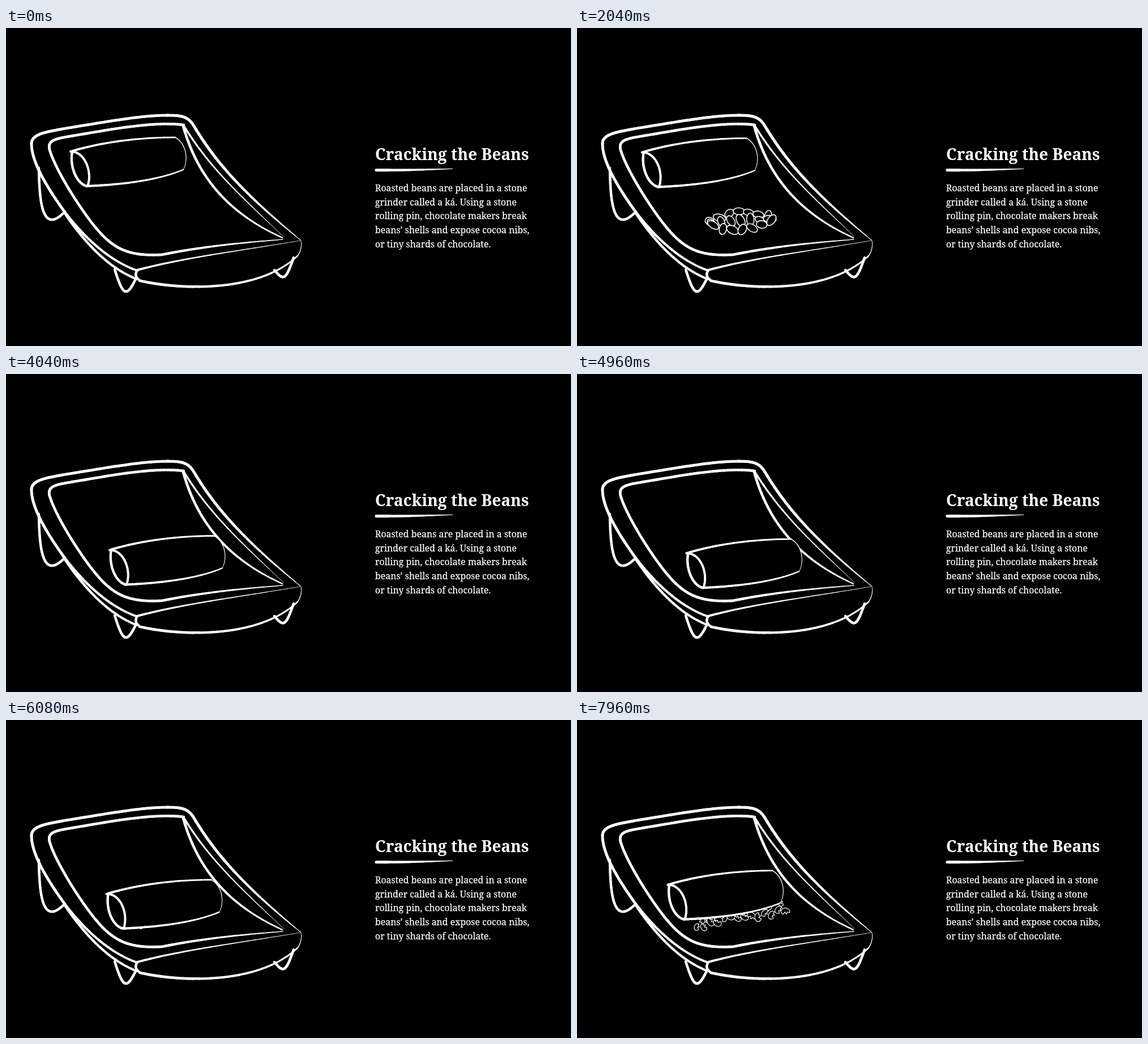
An HTML page with a canvas that plays this animation: 998 px wide and 561 px high, repeating every 8000 ms.

```html
<!DOCTYPE html>
<html lang="en">
<head>
<meta charset="utf-8">
<title>Cracking the Beans</title>
<style>
  html, body { margin: 0; width: 100%; height: 100%; overflow: hidden; background: #000; }
  canvas, svg { position: absolute; left: 0; top: 0; width: 998px; height: 561px; }
  text { fill: #fff; stroke: #fff; stroke-width: 0.25px; font: 15.9px "Noto Serif", serif; }
  .title { font-size: 28.1px; font-weight: 600; stroke: none; }
</style>
</head>
<body>
<canvas id="stage" width="998" height="561"></canvas>
<svg viewBox="0 0 998 561">
  <text class="title" x="652" y="233">Cracking the Beans</text>
  <text x="652" y="287.5">Roasted beans are placed in a stone</text>
  <text x="652" y="312.5">grinder called a ká. Using a stone</text>
  <text x="652" y="337">rolling pin, chocolate makers break</text>
  <text x="652" y="362">beans’ shells and expose cocoa nibs,</text>
  <text x="652" y="387">or tiny shards of chocolate.</text>
</svg>
<script>
const W = 998, H = 561, LOOP = 8000;
const ctx = document.getElementById('stage').getContext('2d');
const smooth = p => p * p * (3 - 2 * p);
const clamp = p => Math.max(0, Math.min(1, p));
const mix = (a, b, p) => a + (b - a) * p;
const random = n => { const v = Math.sin(n * 12.9898) * 43758.5453; return v - Math.floor(v); };

// Samples along joined cubic Béziers: a start, then three points per piece
function curve(...c) {
  const out = [], steps = 30;
  const axis = (i, u) => {
    const v = 1 - u;
    return v * v * v * c[i] + 3 * v * v * u * c[i + 2] + 3 * v * u * u * c[i + 4] + u * u * u * c[i + 6];
  };
  for (let i = 0; i + 7 < c.length; i += 6) {
    for (let s = 0; s <= steps; s++) out.push([axis(i, s / steps), axis(i + 1, s / steps)]);
  }
  return out;
}

// Stroke whose width runs from w0 to w1; a higher power tapers later
function brush(g, pts, w0, w1 = w0, power = 1) {
  g.strokeStyle = '#fff';
  g.lineCap = 'round';
  for (let i = 1; i < pts.length; i++) {
    g.lineWidth = mix(w0, w1, (i / pts.length) ** power);
    g.beginPath();
    g.moveTo(...pts[i - 1]);
    g.lineTo(...pts[i]);
    g.stroke();
  }
}

function drawGrinder(g) {
  const line = (pts, ...width) => brush(g, curve(...pts), ...width);
  // outer rim
  line([104, 325, 70, 278, 45, 235, 45, 204, 45, 186, 75, 183, 100, 178,
    180, 165, 240, 154, 285, 154, 310, 154, 322, 156, 332, 173], 4.8);
  line([332, 173, 375, 245, 430, 300, 520, 374], 5, 0.8, 3);
  line([104, 325, 140, 372, 185, 412, 232, 428], 4.6, 3.6);
  line([104, 327, 140, 380, 182, 424, 231, 443], 4.6, 3.8);
  // inner rim
  line([314, 171, 260, 164, 180, 180, 125, 189, 90, 195, 70, 196, 78, 218,
    90, 255, 135, 325, 160, 354, 195, 396, 225, 402, 275, 400], 4.6);
  line([275, 400, 340, 387, 400, 380, 489, 373], 4.6, 1.2, 1.4);
  line([313, 173, 340, 270, 400, 330, 488, 370], 4.6, 2.2, 2);
  line([315, 174, 365, 255, 430, 310, 490, 368], 3.6, 0.6);
  // front panel
  line([232, 427, 310, 406, 400, 395, 520, 375], 4.2, 0.6, 0.8);
  line([232, 427, 227, 435, 229, 440, 237, 446], 4);
  line([237, 446, 320, 464, 450, 464, 515, 402], 4.8, 2.4, 2);
  line([515, 402, 520, 395, 523, 385, 521, 375], 1.4, 0.7);
  // legs
  line([58, 247, 59, 300, 62, 368, 104, 324], 4.4);
  line([192, 426, 206, 470, 212, 478, 229, 443], 4.4);
  line([474, 427, 490, 446, 494, 446, 508, 405], 4.4);
  // title rule
  line([654, 250.7, 700, 251, 740, 250, 789, 248.3], 5, 0.8, 1.6);
}

const grinder = document.createElement('canvas');
grinder.width = W;
grinder.height = H;
drawGrinder(grinder.getContext('2d'));

const pin = {
  top: curve(114, 218, 170, 201, 235, 193, 299, 193),
  right: curve(299, 193, 320, 205, 322, 235, 313, 250),
  base: curve(142, 279, 210, 276, 270, 268, 313, 250),
  capOuter: curve(117, 218, 112, 245, 125, 275, 143, 279),
  capInner: curve(117, 218, 140, 220, 153, 255, 144, 279)
};

// One pass: down from the top, then short strokes at the low end
const TOP = 0, MID = 46, LOW = 101;
const pass = (start, stroke) => [[start, TOP],
  ...[0, 1, 2, 3, 4].map(i => [start + 800 + i * stroke, i % 2 ? MID : LOW])];
const rolls = [...pass(2000, 485), [5475, TOP], ...pass(5610, 510)];

function pinShift(t) {
  const i = rolls.findIndex(key => key[0] > t);
  if (i === 0) return TOP;
  const [t0, a] = rolls[i - 1], [t1, b] = rolls[i];
  return mix(a, b, smooth((t - t0) / (t1 - t0)));
}

function drawPin(t) {
  const x = pinShift(t);
  ctx.save();
  ctx.translate(x, 103 * (1 - (1 - x / LOW) ** 2));
  ctx.fillStyle = '#000';
  ctx.beginPath();
  [...pin.capOuter, ...pin.base, ...[...pin.right].reverse(), ...[...pin.top].reverse()]
    .forEach(p => ctx.lineTo(...p));
  ctx.fill();
  brush(ctx, pin.top, 4, 2.6);
  brush(ctx, pin.right, 1.4, 0.8);
  brush(ctx, pin.base, 4.2, 2.2);
  brush(ctx, pin.capOuter, 4.2);
  brush(ctx, pin.capInner, 3.8);
  ctx.restore();
}

function outline(width) {
  ctx.fillStyle = '#000';
  ctx.strokeStyle = '#fff';
  ctx.lineWidth = width;
  ctx.fill();
  ctx.stroke();
}

// Three arched rows of whole beans, dropping in one after another
function drawBeans(t) {
  const cols = 7;
  for (let i = 0; i < 3 * cols; i++) {
    const row = Math.floor(i / cols) - 1, u = (i % cols + 0.5) / cols;
    const p = clamp((t - 200 - random(i + 5) * 630) / 810), fall = (1 - p) ** 3;
    if (!p) continue;
    const x = 229 + 120 * u + row * 3;
    const y = 345 - 9 * u + row * 16 * Math.sin(Math.PI * u) + 4 * random(i + 40) - 2;
    ctx.beginPath();
    ctx.ellipse(x, mix(y, -20, fall), 8.5 + 3 * random(i), 5.5 + 1.5 * random(i + 20),
      3 * random(i + 60) + 2 * fall, 0, 7);
    outline(1.6);
  }
}

// Half shell with a jagged break
function shard(x, y, r, tilt) {
  ctx.save();
  ctx.translate(x, y);
  ctx.rotate(tilt);
  ctx.beginPath();
  ctx.ellipse(0, 0, r, r * 0.75, 0, -1.1, Math.PI + 0.3);
  ctx.lineTo(-r * 0.5, -r * 0.1);
  ctx.lineTo(-r * 0.3, -r * 0.6);
  ctx.lineTo(r * 0.1, -r * 0.15);
  ctx.closePath();
  outline(1.2);
  ctx.restore();
}

// Crushed pile, wider after each crushing stroke
function drawShards(t) {
  const cols = 14, spread = t < 6300 ? 0.8 : t < 7250 ? 0.95 : 1;
  for (let i = 0; i < 3 * cols; i++) {
    const row = 2 - Math.floor(i / cols), u = (i % cols) / (cols - 1);
    const x = 156 * (u - 0.5) * (1 - row * 0.1);
    const y = 15 - 28 * u - row * 13 + 10 * (random(i + 80) - 0.5);
    shard(290 + x * spread, 348 + y * spread, 6 + 2 * random(i), 6.3 * random(i + 30));
  }
}

function render(t) {
  ctx.drawImage(grinder, 0, 0);
  if (t < 2650) drawBeans(t);
  else drawShards(t);
  drawPin(t);
}

const start = performance.now();
function tick() {
  const t = (performance.now() - start) % LOOP;
  ctx.clearRect(0, 0, W, H);
  render(Math.floor(t / 40) * 40);
  requestAnimationFrame(tick);
}
tick();
</script>
</body>
</html>
```
